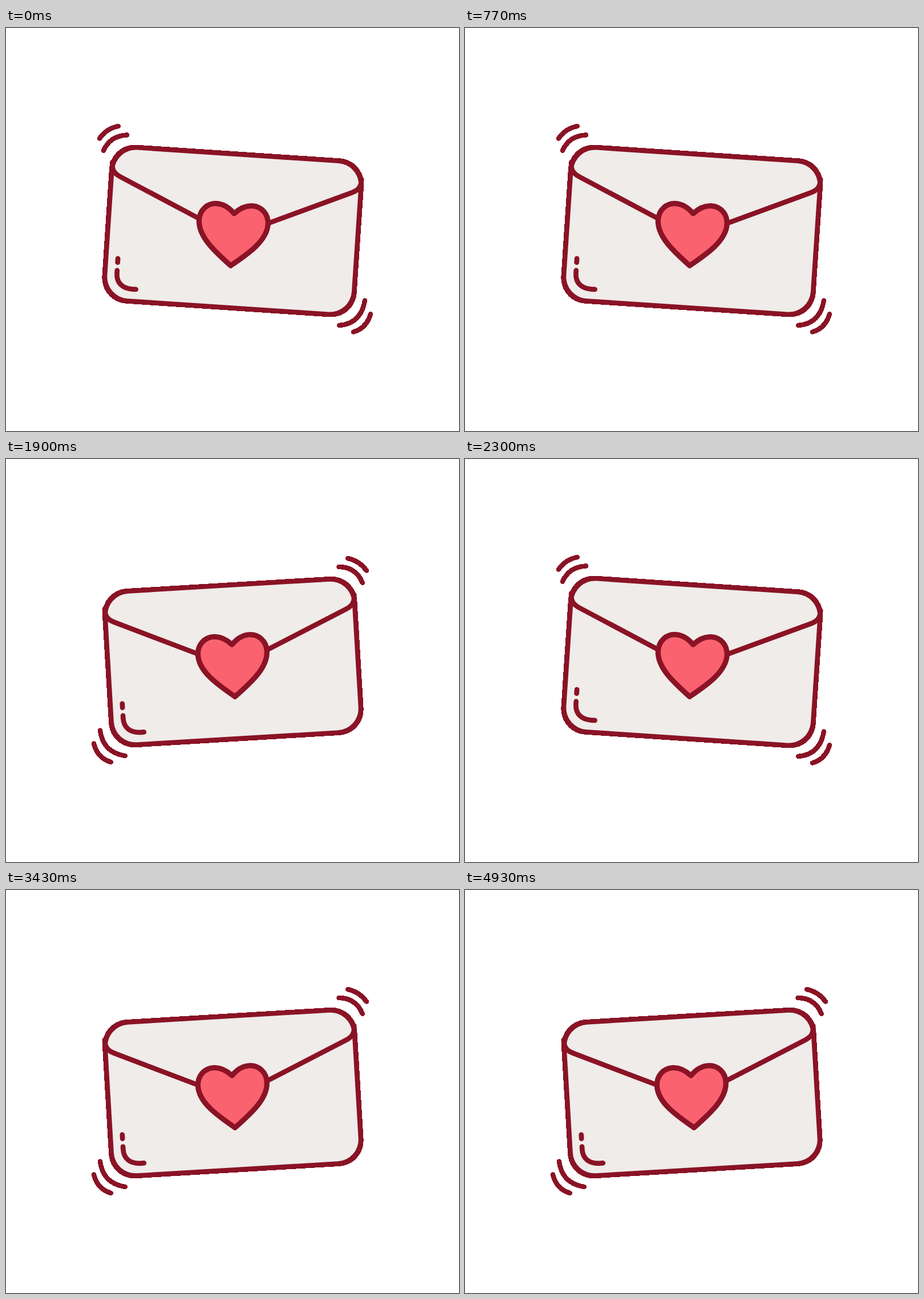
Write an HTML page that moves like this. It is 794x706 px and loops after 5.33 s.

```html
<!DOCTYPE html>
<html lang="en">
<head>
<meta charset="utf-8">
<title>Love letter</title>
<style>
  html, body { margin: 0; width: 100%; height: 100%; overflow: hidden; background: #fff; }
  svg { display: block; width: 794px; height: 706px; }

  .ink { fill: none; stroke: #8a1325; stroke-width: 8.7; stroke-linecap: round; stroke-linejoin: round; }
  .edge { fill: #8a1325; shape-rendering: crispEdges; }
  .paper { fill: #efecea; }
  .heart { fill: #fa626f; stroke-width: 9.2; }
  .shake { stroke-width: 8.5; shape-rendering: crispEdges; }

  /* The two poses swap hard, at slightly uneven beats. */
  .pose { animation: swap 5330ms step-end infinite; }
  .right { --even: visible; --odd: hidden; }
  .left { --even: hidden; --odd: visible; }
  @keyframes swap {
    0%, 14.446%, 28.705%, 43.151%, 57.598%, 71.857%, 85.741% { visibility: var(--even); }
    6.941%, 21.2%, 35.647%, 50.093%, 64.352%, 78.236%, 92.495% { visibility: var(--odd); }
  }
</style>
</head>
<body>
<svg viewBox="0 0 794 706">
  <defs>
    <g id="letter">
      <rect class="edge" x="-223.6" y="-139.3" width="447.2" height="278.6" rx="45"/>
      <rect class="paper" x="-214.75" y="-130.5" width="429.5" height="261" rx="38"/>
      <path class="ink" d="M-219-106C-219-91-213-86-203-81.5L0 9.5L203-80.5C213-85 219-90 219-105"/>
      <path class="ink heart" d="M0-30.5C-9-40-20-46-31-46C-48-46-60.5-33-60.5-15.5C-60.5 14-28 39 0 61C28 39 60.5 14 60.5-15.5C60.5-33 48-46 31-46C20-46 9-40 0-30.5Z"/>
      <path class="ink" d="M-198 61.5V68.5M-198 82.5V87C-198 104-187 113.5-169 113.5H-163"/>
    </g>
  </defs>

  <g class="pose right">
    <use href="#letter" transform="translate(397.8 355.5) rotate(3.8)"/>
    <path class="ink shake" d="M164 193.5Q176 176 197 172M171 215Q182 189 212 187.5M629 477.5Q622 518 584 521M639 501Q632 526 609 532.5"/>
  </g>

  <g class="pose left">
    <use href="#letter" transform="translate(397.8 355.5) rotate(-3.4)"/>
    <path class="ink shake" d="M599 174Q619 178 632 195.5M583.5 189Q613 189 625 217M165 475.5Q170 514 209 520M154 498.5Q160 524 184 531"/>
  </g>
</svg>
</body>
</html>
```
